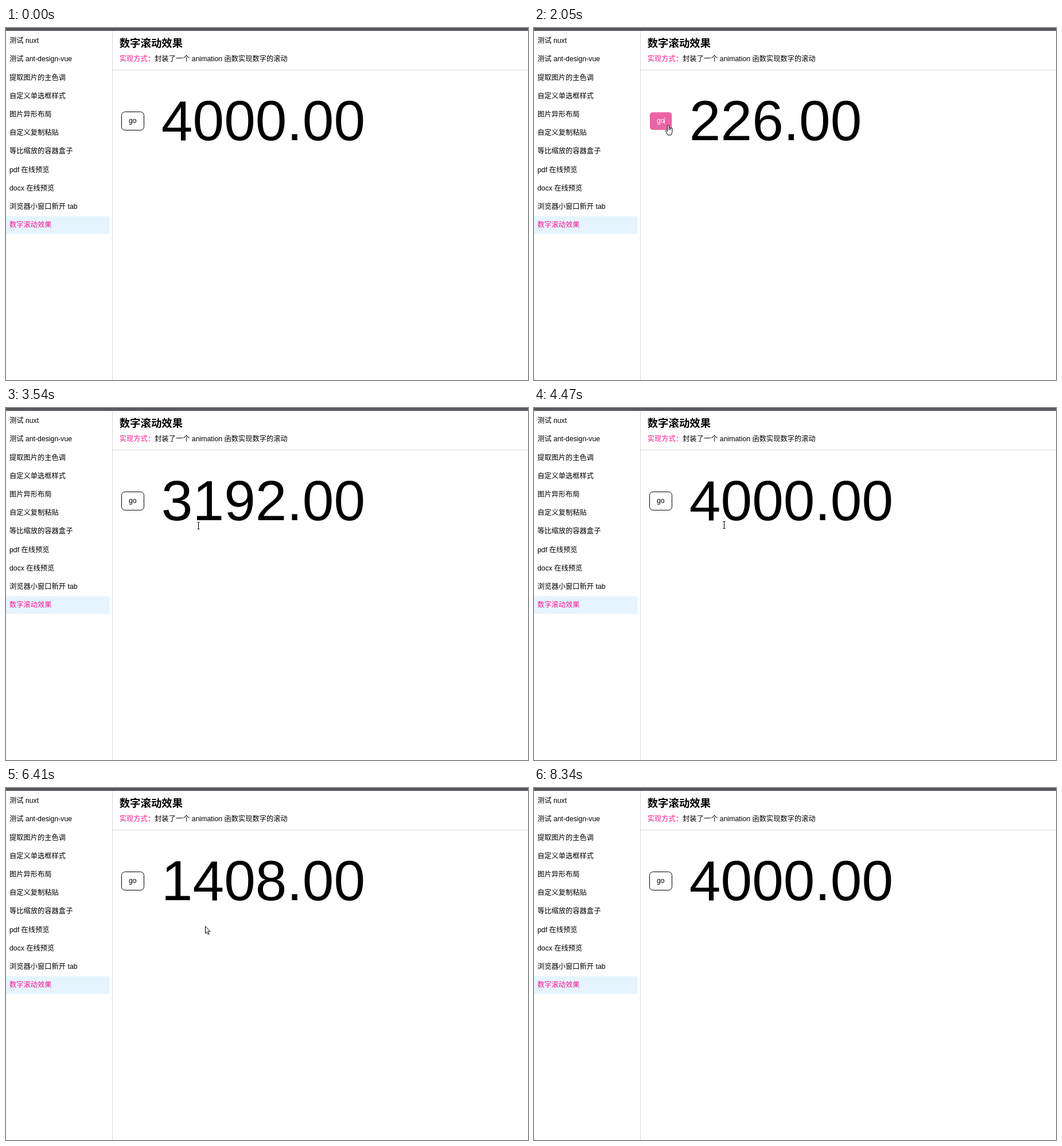
Write an HTML page with a canvas that moves like this. It is 910 px wide and 615 px high and loops after 8890 ms.

```html
<!DOCTYPE html>
<html lang="zh-CN">
<head>
<meta charset="utf-8">
<title>数字滚动效果</title>
<style>
html, body { margin: 0; width: 100%; height: 100%; overflow: hidden; background: #fff; }
canvas { display: block; }
</style>
</head>
<body>
<canvas id="stage" width="910" height="615"></canvas>
<script>
const ctx = document.getElementById('stage').getContext('2d');
const LOOP = 8890;
const STEP = 77.4, PHASE = 37;
const FAMILY = '"Liberation Sans", Arial, "Noto Sans CJK SC", "Noto Sans CJK", sans-serif';
const TEXT = 12.28;
const PINK = '#ff1493';

const MENU = ['测试 nuxt', '测试 ant-design-vue', '提取图片的主色调', '自定义单选框样式',
  '图片异形布局', '自定义复制粘贴', '等比缩放的容器盒子', 'pdf 在线预览',
  'docx 在线预览', '浏览器小窗口新开 tab', '数字滚动效果'];

const SHOW = 70, HIDE = 8300;

// Each click lights a disc and starts a count to 4000.
const CLICKS = [
  { at: 1890, start: 1937.3, length: 1983.3 },
  { at: 5600, start: 5683.7, length: 1988.9 }
];

// Pointer moves: start, end, target; it rests in between.
const ENTRY = [883, 602];
const MOVES = [
  [70, 950, 402, 169],
  [950, 1710, 234, 169],
  [2130, 2740, 335, 206],
  [4400, 4830, 235, 170],
  [5530, 5600, 222, 158],
  [5800, 6383, 347, 241],
  [6383, 7312, 762, 519],
  [7400, 8300, 889, 612]
];

const hold = t => PHASE + STEP * Math.max(0, Math.floor((t - PHASE) / STEP));
const ease = u => u * u * (3 - 2 * u);

function pointerAt(t) {
  if (t < SHOW || t >= HIDE) return null;
  let [x, y] = ENTRY;
  for (const [from, to, tx, ty] of MOVES) {
    if (t < from) break;
    const e = ease(Math.min(1, (t - from) / (to - from)));
    x += (tx - x) * e;
    y += (ty - y) * e;
  }
  return [Math.round(x), Math.round(y)];
}

function countAt(t) {
  const run = CLICKS.filter(c => t >= c.start).pop();
  return run ? 2 * Math.round(2000 * Math.min(1, (t - run.start) / run.length)) : 4000;
}

function label(str, x, y, color = '#000', size = TEXT, weight = 'normal') {
  ctx.font = `${weight} ${size}px ${FAMILY}`;
  ctx.fillStyle = color;
  ctx.fillText(str, x, y);
}

function rect(x, y, w, h, color) {
  ctx.fillStyle = color;
  ctx.fillRect(x, y, w, h);
}

function roundRect(x, y, w, h, r) {
  ctx.beginPath();
  ctx.roundRect(x, y, w, h, r);
}

function drawPage() {
  rect(0, 0, 910, 615, '#fff');
  rect(0, 0, 910, 5, '#5a565e');
  rect(185, 5, 1, 610, '#d9d9d9');
  rect(186, 73, 724, 1, '#d9d9d9');
  roundRect(0, 329, 180.5, 30.7, [0, 3, 3, 0]);
  ctx.fillStyle = '#e6f4ff';
  ctx.fill();
  MENU.forEach((item, i) =>
    label(item, 6, Math.round(26.2 + i * 32.2), i === MENU.length - 1 ? PINK : '#000'));
  label('数字滚动效果', 197.7, 33, '#000', 18.42, 'bold');
  label('实现方式：', 197.7, 58, PINK);
  label('封装了一个 animation 函数实现数字的滚动', 259.1, 58);
}

function drawButton(hover, caret) {
  if (hover) {
    roundRect(202, 147.3, 38.2, 30.7, 5);
    ctx.fillStyle = '#ee62a5';
    ctx.fill();
  } else {
    roundRect(201.5, 146.5, 39, 32, 6);
    ctx.strokeStyle = '#000';
    ctx.lineWidth = 1;
    ctx.stroke();
  }
  label('go', 214, 166, hover ? '#fff' : '#000');
  if (hover && caret) rect(227, 156, 1, 12, 'rgba(255,255,255,.8)');
}

function drawClick(x, y) {
  ctx.beginPath();
  ctx.arc(x, y + 1, 9.8, 0, 7);
  ctx.fillStyle = 'rgba(248,176,56,.75)';
  ctx.fill();
}

function outline(shape) {
  ctx.fillStyle = '#fff';
  ctx.fill(shape);
  ctx.stroke(shape);
}

const ARROW = new Path2D('M.5.5V13L3.3 10.4 5.2 14.8 7.1 14 5.2 9.7H8.9Z');
const HAND = new Path2D('M-1.4 1.4Q0-.6 1.4 1.4V6Q3.4 5 4 6.4Q5.8 4.8 7 6.4V12Q6.6 15 5 18H-1L-4 12.2Q-5.4 9.8-3.6 9.3L-1.4 11.4Z');
const FINGERS = new Path2D('M1.4 6V9.5M4 6V9.5');
const BEAM = new Path2D('M-2-6.5H2M0-6.5V5.5M-2 5.5H2');

function drawPointer(x, y, hover) {
  const overText = x > 268 && x < 624 && y > 105 && y < 222;
  ctx.save();
  ctx.translate(x, y);
  ctx.strokeStyle = '#000';
  ctx.lineWidth = 1;
  ctx.lineJoin = 'round';
  if (hover) {
    outline(HAND);
    ctx.stroke(FINGERS);
  } else if (overText) {
    ctx.translate(0.5, 0);
    ctx.stroke(BEAM);
  } else {
    outline(ARROW);
  }
  ctx.restore();
}

function draw(now) {
  const t = hold(now % LOOP);
  const p = pointerAt(t);
  const hover = !!p && p[0] > 201 && p[0] < 241 && p[1] > 146 && p[1] < 179;
  drawPage();
  drawButton(hover, t < 5060);
  label(countAt(t).toFixed(2), 270.8, 195.8, '#000', 98.3);
  if (p) {
    if (CLICKS.some(c => t >= c.at && t < c.at + 2 * STEP)) drawClick(...p);
    drawPointer(...p, hover);
  }
}

function tick() {
  draw(performance.now());
  requestAnimationFrame(tick);
}
tick();
</script>
</body>
</html>
```
